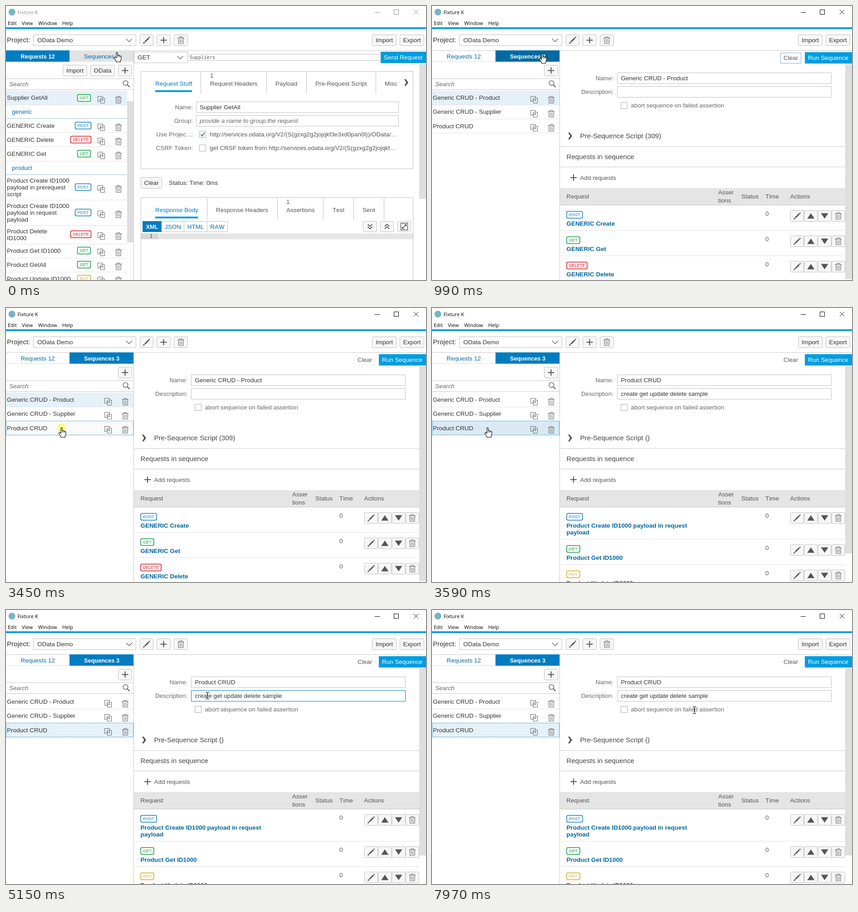
An HTML page with a canvas that plays this animation: 926 by 605 pixels, repeating every 8 s.

```html
<!DOCTYPE html>
<html lang="en">
<head>
<meta charset="utf-8">
<title>Fixture K</title>
<style>
html, body { margin: 0; width: 100%; height: 100%; overflow: hidden; background: #fff; }
canvas { display: block; }
</style>
</head>
<body>
<canvas id="stage" width="926" height="605"></canvas>
<script>
const c = document.getElementById('stage').getContext('2d');
c.fontKerning = 'none';
const LOOP = 8000;
const SANS = '"Liberation Sans", Arial, sans-serif';
const BODY = '13.45px ' + SANS;
const BOLD = 'bold 13.45px ' + SANS;
const TAB_BOLD = 'bold 12.8px ' + SANS;
const ITALIC = 'italic 13.45px ' + SANS;
const HEAD = '15.1px ' + SANS;
const TINY = '9px ' + SANS;
const MENU = '11px "Open Sans", "Noto Sans", sans-serif';
const MONO = '10.4px "DejaVu Sans Mono", monospace';
const BLUE = '#007cc0', SKY = '#009de0', INK = '#333', GREY = '#666', EDGE = '#bfbfbf', RULE = '#e3e3e3';
const METHOD = { GET: '#0a9c3c', POST: '#1279c6', DELETE: '#d4141e', PUT: '#dba511' };

// time, x, y of the hot spot, shape
const POINTER = [
  [0, 244.5, 102, 'hand'], [280, 243.5, 104, 'hand'], [400, 243, 105, 'hand'],
  [1550, 236, 111, 'hand'], [1670, 220, 127, 'arrow'], [1820, 195, 150, 'arrow'],
  [1970, 160.5, 193, 'hand'], [2120, 152, 210, 'hand'], [2240, 139, 238, 'hand'],
  [2360, 128, 256, 'hand'], [2480, 122, 262, 'hand'], [2640, 122.5, 264, 'hand'],
  [4030, 234, 255, 'hand'], [4180, 292, 241, 'arrow'], [4310, 350, 227, 'arrow'],
  [4450, 401, 212, 'arrow'], [4580, 444, 202, 'beam'], [4730, 442, 195, 'beam'],
  [4850, 441, 191, 'beam'], [5150, 444, 189, 'beam'], [5270, 458, 197, 'beam'],
  [5420, 467, 195, 'beam'], [5540, 474, 192, 'beam'], [5820, 478, 197, 'beam'],
  [5940, 480, 200, 'beam'], [6090, 494, 198, 'beam'], [6220, 508, 195, 'beam'],
  [6620, 521, 197, 'beam'], [6740, 534, 198, 'beam'], [6890, 545, 195, 'beam'],
  [7040, 547, 187, 'beam'], [7720, 559, 200, 'beam'], [7845, 572, 214, 'beam'],
  [7970, 578.5, 221, 'beam']
];
const CLICKS = [[680, 830], [3450, 3590], [4730, 4850]];

// baselines sit on whole pixels to keep the glyphs crisp
function text(s, x, y, color = INK, font = BODY, align = 'left') {
  c.font = font;
  c.fillStyle = color;
  c.textAlign = align;
  c.fillText(s, x, Math.round(y));
}
function rect(x, y, w, h, color) {
  c.fillStyle = color;
  c.fillRect(x, y, w, h);
}
function box(x, y, w, h, edge = EDGE, fill, r = 0, lw = 1) {
  c.beginPath();
  c.roundRect(x + 0.5, y + 0.5, w - 1, h - 1, r);
  if (fill) { c.fillStyle = fill; c.fill(); }
  c.strokeStyle = edge;
  c.lineWidth = lw;
  c.stroke();
}
function dotted(x, y, w, h, color) {
  c.setLineDash([1, 1]);
  box(x, y, w, h, color);
  c.setLineDash([]);
}
function trace(pts, close) {
  c.beginPath();
  for (let i = 0; i < pts.length; i += 2) c.lineTo(pts[i], pts[i + 1]);
  if (close) c.closePath();
}
function line(pts, color = '#555', lw = 1.2) {
  trace(pts);
  c.strokeStyle = color;
  c.lineWidth = lw;
  c.stroke();
}
function fill(pts, color = '#555') {
  trace(pts, true);
  c.fillStyle = color;
  c.fill();
}
function at(x, y, draw) {
  c.save();
  c.translate(x, y);
  draw();
  c.restore();
}

const icon = {
  pencil() {
    line([-4, 4, 5, -5], '#555', 3);
    fill([-8, 8, -6.5, 3.5, -3.5, 6.5]);
    line([5.5, -7.5, 7.5, -5.5], '#555', 2);
  },
  plus() {
    rect(-7, -1, 14, 2, '#555');
    rect(-1, -7, 2, 14, '#555');
  },
  trash() {
    line([-7, -5, 7, -5], GREY);
    line([-3, -5, -3, -7.5, 3, -7.5, 3, -5], GREY, 1);
    line([-5.5, -5, -5, 7.5, 5, 7.5, 5.5, -5], GREY, 1.1);
    for (const x of [-2.3, 0, 2.3]) line([x, -2.5, x, 5.5], '#888', 1);
  },
  copy() {
    line([-2, 3.5, -7.5, 3.5, -7.5, -7.5, 3.5, -7.5, 3.5, -3.5], GREY, 1);
    box(-2, -4, 10, 12, GREY);
    line([-4.5, 0.5, 4.5, 0.5], GREY, 1);
    line([2, -2, 4.5, 0.5, 2, 3], GREY, 1);
  },
  up() { fill([-8, 6, 0, -6, 8, 6]); },
  down() { fill([-8, -6, 0, 6, 8, -6]); },
  chevron() { line([-6.5, -3.5, 0, 3, 6.5, -3.5], GREY, 1.3); },
  next() { fill([-4.5, -7.5, -1, -7.5, 4.5, 0, -1, 7.5, -4.5, 7.5, 0, 0]); },
  expand() {
    for (const y of [-5, 0.5]) line([-5, y, 0, y + 4.5, 5, y], '#555', 1.8);
  },
  collapse() {
    for (const y of [-0.5, 5]) line([-5, y, 0, y - 4.5, 5, y], '#555', 1.8);
  },
  full() {
    box(-8, -8, 16, 16, '#555', null, 0, 1.3);
    line([-4, 4, 4, -4], '#555', 1.6);
    fill([0, -5, 5, -5, 5, 0]);
    fill([0, 5, -5, 5, -5, 0]);
  }
};
const put = (name, x, y) => at(x, y, icon[name]);

function button(x, y, w, label, h = 25) {
  box(x, y, w, h, EDGE, '#f7f7f7', 2);
  if (icon[label]) put(label, x + w / 2, y + h / 2);
  else text(label, x + w / 2, y + 17, INK, BODY, 'center');
}
function primary(x, y, w, label) {
  rect(x, y, w, 25, SKY);
  text(label, x + 7, y + 17, '#fff');
}
function badge(kind, x, cy) {
  const w = { GET: 30, POST: 36, DELETE: 46, PUT: 30 }[kind];
  box(x, cy - 8, w, 16, METHOD[kind], '#fff', 3, 1.5);
  text(kind, x + w / 2, cy + 3, METHOD[kind], TINY, 'center');
}
function check(x, y, on) {
  box(x, y, 15, 15, '#ababab', '#fff');
  if (on) line([x + 3.5, y + 7.5, x + 6.5, y + 11, x + 11.5, y + 3.5], BLUE, 1.8);
}

function frame(active) {
  rect(0, 0, 926, 605, '#fff');
  const tone = active ? '#000' : '#8c8c8c';
  c.beginPath();
  c.arc(13, 13.5, 7.5, 0, 7);
  c.fillStyle = '#76b5c4';
  c.fill();
  text('Fixture K', 25.5, 18, tone, MENU);
  line([813, 14.5, 824, 14.5], tone, 1);
  box(855, 8, 11, 11, tone);
  line([899, 8.5, 909, 18.5], tone, 1);
  line([909, 8.5, 899, 18.5], tone, 1);
  [['Edit', 4], ['View', 35], ['Window', 71], ['Help', 124]].forEach(([s, x]) => text(s, x, 42, '#000', MENU));
  rect(0, 47, 926, 4, SKY);
  text('Project:', 2, 80, INK, HEAD);
  box(60, 63, 227, 25, EDGE, '#fff');
  text('OData Demo', 69, 80);
  put('chevron', 271.5, 76);
  button(295, 63, 30, 'pencil');
  button(332, 63, 31, 'plus');
  button(370, 63, 31, 'trash');
  button(807, 63, 54, 'Import');
  button(868, 63, 54, 'Export');
  rect(0, 98, 926, 1, '#c8c8c8');
}

function sidebar() {
  rect(281, 98, 1, 507, '#c8c8c8');
  button(247, 130, 31, 'plus');
  rect(0, 160, 281, 1, '#c8c8c8');
  rect(0, 184, 281, 1, '#c8c8c8');
  text('Search', 7, 177, GREY, ITALIC);
  c.beginPath();
  c.arc(263.5, 170, 5.3, 0, 7);
  c.strokeStyle = '#555';
  c.lineWidth = 1.3;
  c.stroke();
  line([267.5, 174, 272.5, 179], '#555', 1.8);
}

function requestList() {
  rect(267, 210, 14, 312, '#dedede');
  rect(0, 187, 267, 31, '#e5f1f8');
  const rows = [
    ['GET', 'Supplier GetAll'], ['', 'generic'], ['POST', 'GENERIC Create'], ['DELETE', 'GENERIC Delete'],
    ['GET', 'GENERIC Get'], ['', 'product'], ['POST', 'Product Create ID1000', 'payload in prerequest', 'script'],
    ['POST', 'Product Create ID1000', 'payload in request', 'payload'], ['DELETE', 'Product Delete', 'ID1000'],
    ['GET', 'Product Get ID1000'], ['GET', 'Product GetAll'], ['PUT', 'Product Update ID1000']
  ];
  let y = 187;
  for (const [kind, ...names] of rows) {
    const h = kind ? [31.1, 41, 56][names.length - 1] : 30.1;
    const mid = Math.round(y + h / 2), end = Math.round(y + h);
    const base = !kind ? 20 : names.length > 1 ? 18 : 20.4;
    names.forEach((s, i) => text(s, kind ? 2 : 13, y + base + 15 * i, kind ? INK : '#0a68ab'));
    if (kind) {
      badge(kind, { GET: 157, PUT: 157, POST: 152, DELETE: 142 }[kind], mid);
      put('copy', 210, mid + 4);
      put('trash', 248, mid + 4);
    }
    rect(0, end, 267, 1, kind ? RULE : '#9fbfd9');
    y += h;
  }
}

function tabStrip(items, y, first, w) {
  items.forEach(([label, x, edge, count], i) => {
    text(label, x, y + 32, i ? '#555' : BLUE);
    if (count) text(count, x, y + 14, '#555');
    if (edge) rect(edge, y + 1, 1, 49, EDGE);
  });
  rect(first, y + 42, w, 4, SKY);
}

function requestPage(t) {
  rect(0, 98, 140, 25, BLUE);
  text('Requests 12', 70, 116, '#fff', TAB_BOLD, 'center');
  rect(140, 98, 141, 25, '#e3e3e3');
  if (t >= 680) dotted(140, 98, 141, 25, BLUE);
  text('Sequences 3', 211, 116, '#0a68ab', BODY, 'center');
  button(125, 130, 54, 'Import');
  button(186, 130, 54, 'OData');
  sidebar();
  requestList();

  rect(911, 128, 15, 298, '#dedede');
  box(282, 101, 119, 25, EDGE, '#fff');
  text('GET', 290, 118);
  put('chevron', 384, 114);
  box(400, 106, 427, 15, EDGE, '#fff');
  text('Suppliers', 405, 117, '#555', MONO);
  primary(826, 101, 100, 'Send Request');

  box(297, 144, 601, 216);
  tabStrip([['Request Stuff', 329, 429], ['Request Headers', 450, 574, '1'], ['Payload', 594, 662],
    ['Pre-Request Script', 682, 815], ['Misc', 835]], 144, 329, 81);
  put('next', 882.5, 169);
  [['Name:', 228], ['Group:', 258], ['Use Projec...:', 288], ['CSRF Token:', 318]]
    .forEach(([s, y]) => text(s, 412, y, GREY, BODY, 'right'));
  box(419, 211, 447, 25);
  text('Supplier GetAll', 427, 228);
  box(419, 241, 447, 25);
  text('provide a name to group the request', 427, 258, GREY, ITALIC);
  check(426, 276, true);
  text('http://services.odata.org/V2/(S(gzxg2g2jojqkf3e3xd0pan0l))/OData/…', 449, 288, '#555');
  check(426, 306);
  text('get CRSF token from http://services.odata.org/V2/(S(gzxg2g2jojqkf…', 449, 318, '#555');

  button(297, 378, 47, 'Clear');
  text('Status: Time: 0ms', 359, 395);
  box(297, 422, 601, 190);
  tabStrip([['Response Body', 329, 443], ['Response Headers', 463, 598], ['Assertions', 618, 699, '1'],
    ['Test', 720, 766], ['Sent', 786, 833]], 423, 329, 94);
  box(301, 475, 188, 24, EDGE, '#fff', 2);
  rect(301, 475, 42, 24, BLUE);
  text('XML', 322, 492, '#fff', TAB_BOLD, 'center');
  [['JSON', 368, 392], ['HTML', 418, 443], ['RAW', 466]].forEach(([s, x, edge]) => {
    text(s, x, 492, '#0a68ab', BODY, 'center');
    if (edge) rect(edge, 475, 1, 24, EDGE);
  });
  button(787, 475, 31, 'expand', 24);
  button(825, 475, 30, 'collapse', 24);
  button(863, 475, 30, 'full', 24);
  rect(298, 502, 38, 13, '#d6d6d6');
  rect(336, 502, 561, 13, '#e6e6e6');
  text('1', 323, 512, '#444', MONO, 'right');
}

function sequenceList(t) {
  const last = t >= 3590;
  const hover = t < 1970 ? -1 : t < 2240 ? 0 : t < 2360 ? 1 : t < 4180 ? 2 : -1;
  const chosen = last ? 2 : 0;
  ['Generic CRUD - Product', 'Generic CRUD - Supplier', 'Product CRUD'].forEach((s, i) => {
    const y = 187 + i * 31;
    if (i === chosen) rect(0, y, 281, 31, last && hover === 2 ? '#d9eaf4' : '#e5f1f8');
    else if (i === hover) rect(0, y, 281, 31, '#fafafa');
    rect(0, y + 31, 281, 1, RULE);
    text(s, 2, y + 20 + i * 0.4);
    put('copy', 225, y + 20);
    put('trash', 263, y + 20);
  });
  if (t >= 3450) dotted(0, 249, 281, 32, BLUE);
}

function sequencePage(t) {
  const last = t >= 3590;
  rect(0, 122, 140, 1, '#ddd');
  text('Requests 12', 70, 116, '#0a68ab', BODY, 'center');
  rect(140, 98, 141, 25, t < 1670 ? '#006aa3' : BLUE);
  text('Sequences 3', 211, 116, '#fff', TAB_BOLD, 'center');
  sidebar();
  sequenceList(t);

  rect(911, 128, 15, last ? 414 : 475, '#dedede');
  if (t < 3450) dotted(768, 103, 46, 24, '#00568a');
  text('Clear', 775, 119, '#555');
  primary(822, 102, 104, 'Run Sequence');
  text('Name:', 400, 164, GREY, BODY, 'right');
  text('Description:', 400, 194, GREY, BODY, 'right');
  box(408, 147, 473, 25);
  box(408, 177, 473, 25, t >= 4730 && t < 7970 ? BLUE : EDGE);
  text(last ? 'Product CRUD' : 'Generic CRUD - Product', 416.5, 164);
  if (last) text('create get update delete sample', 416.5, 194);
  check(416, 212);
  text('abort sequence on failed assertion', 438.5, 224, GREY);

  put('next', 304.5, 287);
  text('Pre-Sequence Script (' + (last ? '' : '309') + ')', 326.5, 292, '#444', HEAD);
  rect(282, 310, 629, 1, '#c8c8c8');
  text('Requests in sequence', 296.5, 338, '#444', HEAD);
  rect(282, 355, 629, 1, '#c8c8c8');
  put('plus', 312, 379);
  text('Add requests', 326.5, 384, '#555');
  rect(282, 402, 629, 38, '#e5e5e5');
  rect(282, 439, 629, 1, '#c4c4c4');
  [['Request', 296.5, 425], ['Asser', 631, 416], ['tions', 631, 434], ['Status', 682, 425],
    ['Time', 735, 425], ['Actions', 789.5, 425]].forEach(([s, x, y]) => text(s, x, y, '#555'));

  const rows = last
    ? [['POST', 'Product Create ID1000 payload in request', 'payload'], ['GET', 'Product Get ID1000'], ['PUT', 'Product Update ID1000']]
    : [['POST', 'GENERIC Create'], ['GET', 'GENERIC Get'], ['DELETE', 'GENERIC Delete']];
  let y = 440;
  for (const [kind, ...names] of rows) {
    badge(kind, 296.5, y + 21);
    names.forEach((s, i) => text(s, 296.5, y + 45 + 15 * i, '#00679e', BOLD));
    text('0', 735, y + 22.5, '#555');
    ['pencil', 'up', 'down', 'trash'].forEach((s, i) => button(790 + i * 30.3, y + 11, 30, s));
    y += 41 + 15 * names.length;
    rect(282, y - 1, 629, 1, RULE);
  }
}

const shape = {
  hand() {
    c.beginPath();
    c.moveTo(-1.5, 1.5);
    c.quadraticCurveTo(0, -0.8, 1.5, 1.5);
    c.lineTo(1.5, 7);
    c.quadraticCurveTo(3.5, 5.5, 4.5, 7.7);
    c.quadraticCurveTo(6.5, 6.5, 7.2, 8.7);
    c.quadraticCurveTo(9.6, 8, 9.6, 11);
    c.lineTo(9.4, 15);
    c.lineTo(7.8, 18.5);
    c.lineTo(7.8, 21.5);
    c.lineTo(-1.5, 21.5);
    c.lineTo(-1.8, 19);
    c.lineTo(-5.8, 13.5);
    c.quadraticCurveTo(-6.5, 10, -3.5, 11);
    c.lineTo(-1.5, 13);
    c.closePath();
    c.fillStyle = '#fff';
    c.fill();
    c.strokeStyle = '#000';
    c.lineWidth = 1.1;
    c.stroke();
    for (const x of [1.5, 4.5, 7.2]) line([x, 7.5 + x / 4, x, 11], '#000', 1);
  },
  arrow() {
    const pts = [0.5, 0.5, 0.5, 16.5, 4.2, 13, 6.8, 18.5, 9, 17.5, 6.5, 12, 11.5, 12];
    fill(pts, '#fff');
    trace(pts, true);
    c.strokeStyle = '#000';
    c.lineWidth = 1;
    c.stroke();
  },
  beam() {
    rect(-0.5, -7, 1.2, 14, '#000');
    for (const y of [-8, 7]) {
      rect(-3.5, y, 3, 1.2, '#000');
      rect(0.7, y, 3, 1.2, '#000');
    }
  }
};

function pointer(t) {
  let now = POINTER[0];
  for (const p of POINTER) if (p[0] <= t) now = p;
  const [, x, y, kind] = now;
  if (CLICKS.some(([a, b]) => t >= a && t < b)) {
    c.beginPath();
    c.arc(x, y + 1, 10, 0, 7);
    c.fillStyle = 'rgba(255,255,0,.47)';
    c.fill();
  }
  at(x, y, shape[kind]);
}

let start;
function tick(now) {
  start ??= now;
  const t = (now - start) % LOOP;
  frame(t >= 680);
  (t < 990 ? requestPage : sequencePage)(t);
  pointer(t);
  requestAnimationFrame(tick);
}
requestAnimationFrame(tick);
</script>
</body>
</html>
```
